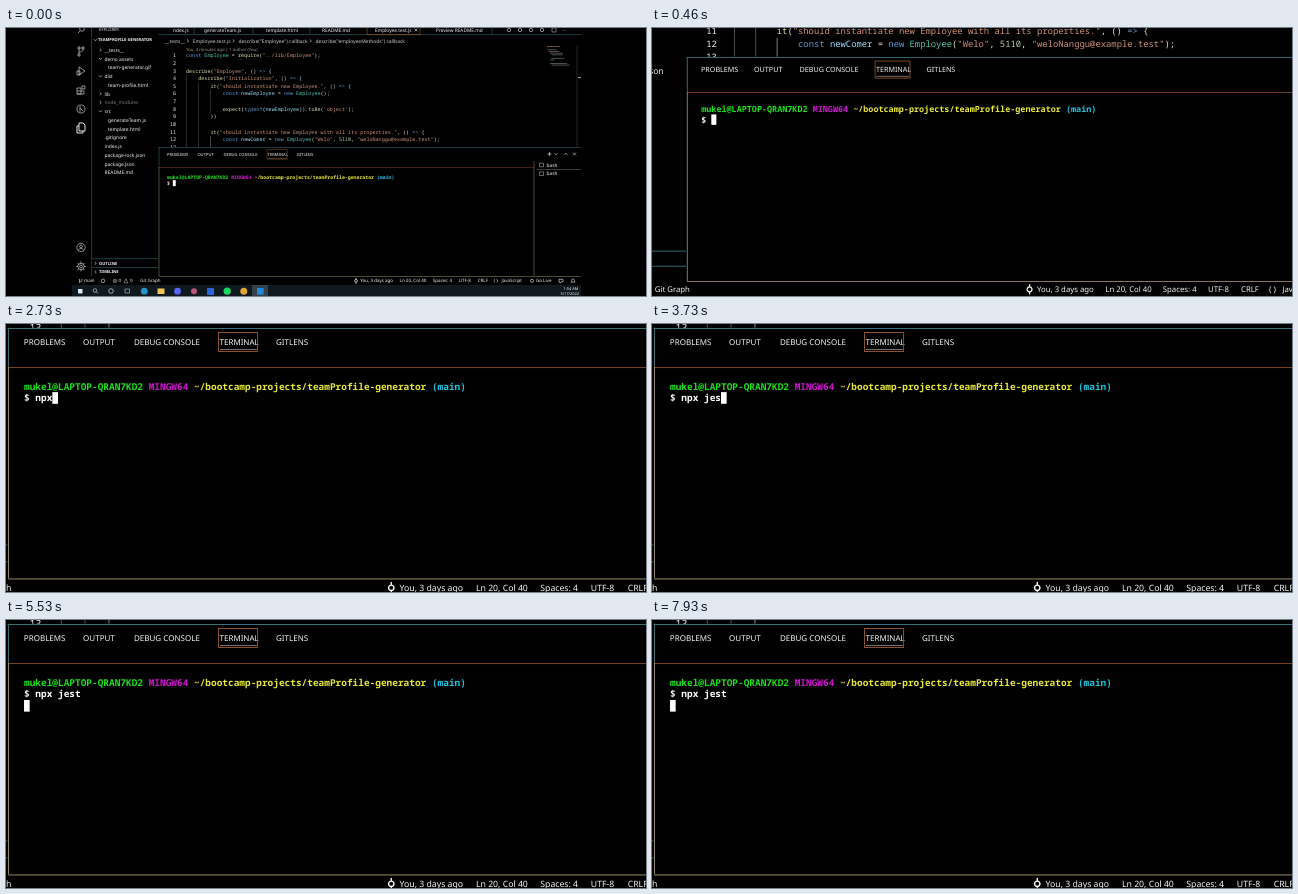
An HTML page with a canvas that plays this animation: 640 by 268 pixels, repeating every 8 s.

```html
<!DOCTYPE html>
<html lang="en">
<head>
<meta charset="utf-8">
<title>Terminal demo</title>
<style>
  html, body { margin: 0; height: 100%; overflow: hidden; background: #000; }
  canvas { display: block; }
</style>
</head>
<body>
<canvas id="stage" width="640" height="268"></canvas>
<script>
const ctx = document.getElementById('stage').getContext('2d');
const LOOP = 8000, ZOOM_TIME = 660;
const ZOOM = { scale: 1.943, x: -294.8, y: -227.5 };
const UI = '"Noto Sans", "Open Sans", sans-serif';
const MONO = '"Noto Sans Mono", "DejaVu Sans Mono", monospace';
const CODE = 5.1, TERM = 4.86, ROW = 7.64, LINE = 0.515;
const TEAL = '#3a7078', TAN = '#958a66', RUST = '#7d431e', LIGHT = '#f4f4f4';

const COLORS = {
  k: '#569cd6', f: '#dcdcaa', s: '#ce9178', c: '#4ec9b0',
  v: '#9cdcfe', n: '#b5cea8', p: '#e0e0e0'
};

// Each code line: indent level, then alternating colour key and text.
const codeLines = [
  [0, 'k', 'const ', 'c', 'Employee', 'p', ' = ', 'f', 'require', 'p', '(', 's', '"../lib/Employee"', 'p', ');'],
  [0],
  [0, 'f', 'describe', 'p', '(', 's', '"Employee"', 'p', ', () ', 'k', '=>', 'p', ' {'],
  [1, 'f', 'describe', 'p', '(', 's', '"Initialization"', 'p', ', () ', 'k', '=>', 'p', ' {'],
  [2, 'f', 'it', 'p', '(', 's', '"should instantiate new Employee."', 'p', ', () ', 'k', '=>', 'p', ' {'],
  [3, 'k', 'const ', 'v', 'newEmployee', 'p', ' = ', 'k', 'new ', 'c', 'Employee', 'p', '();'],
  [3],
  [3, 'f', 'expect', 'p', '(', 'k', 'typeof', 'p', '(', 'v', 'newEmployee', 'p', ')).', 'f', 'toBe', 'p', '(', 's', "'object'", 'p', ');'],
  [2, 'p', '})'],
  [2],
  [2, 'f', 'it', 'p', '(', 's', '"should instantiate new Employee with all its properties."', 'p', ', () ', 'k', '=>', 'p', ' {'],
  [3, 'k', 'const ', 'v', 'newComer', 'p', ' = ', 'k', 'new ', 'c', 'Employee', 'p', '(', 's', '"Welo"', 'p', ', ', 'n', '5110', 'p', ', ', 's', '"weloNanggu@example.test"', 'p', ');'],
  [3]
];

// Prefix: ">" closed folder, "v" open folder, "-" nested file, "." root file.
const tree = ['>__tests__', 'vdemo assets', '-team-generator.gif', 'vdist', '-team-profile.html',
  '>lib', '>node_modules', 'vsrc', '-generateTeam.js', '-template.html', '..gitignore',
  '.index.js', '.package-lock.json', '.package.json', '.README.md'];

const command = 'npx jest';
const keyTimes = [2300, 2480, 2660, 3000, 3300, 3500, 3690, 3900];
const ENTER = 4500;

// y is the middle of the capitals; returns the x where the text ends.
function text(str, x, y, color = LIGHT, size = 4.48, family = UI, weight = 450) {
  ctx.font = `${weight} ${size}px ${family}`;
  ctx.fillStyle = color;
  ctx.fillText(str, x, y + size * 0.36);
  return x + ctx.measureText(str).width;
}

function rect(x, y, w, h, color) {
  ctx.fillStyle = color;
  ctx.fillRect(x, y, w, h);
}

function path(d, x, y, color = '#ccc', width = 0.7) {
  ctx.save();
  ctx.translate(x, y);
  ctx.strokeStyle = color;
  ctx.lineWidth = width;
  ctx.stroke(new Path2D(d));
  ctx.restore();
}

const hLine = (x1, x2, y, color) => rect(x1, y - LINE / 2, x2 - x1, LINE, color);
const vLine = (x, y1, y2, color) => rect(x - LINE / 2, y1, LINE, y2 - y1, color);
const box = (x, y, w, h, color) => path(`M0 0h${w}v${h}h${-w}z`, x, y, color, LINE);

function dot(x, y, r, color) {
  ctx.fillStyle = color;
  ctx.beginPath();
  ctx.arc(x, y, r, 0, 7);
  ctx.fill();
}

const circle = r => `M${r} 0A${r} ${r} 0 1 1 ${-r} 0A${r} ${r} 0 1 1 ${r} 0`;
const CHEVRON = { '>': 'M-.8-1.5L.8 0L-.8 1.5', v: 'M-1.5-.8L0 .8L1.5-.8', '^': 'M-1.5.8L0-.8L1.5.8' };
const CROSS = 'M-1.4-1.4L1.4 1.4M1.4-1.4L-1.4 1.4';

function drawSidebar() {
  vLine(85.5, 0, 248, TEAL);
  path(circle(2.3) + 'M-1.8 1.8L-4 4', 76, 1);
  path('M-2-2V3M-2 1C2 1 2 0 2-2' + 'M-3-4h2v2h-2zM-3 3h2v2h-2zM1-4h2v2h-2z', 75, 23);
  path('M-2-4L4 0L-2 4z' + 'M-4 0h3v4h-3z', 75, 43);
  path('M-4-2h4v6h-4zM-4 1h7v3h-7M1-4h3v3h-3z', 75, 62);
  path(circle(4) + 'M-1-3V3M-1-1L2 2', 75, 81);
  path('M-2-5h4l2 2v6h-6zM-2-2h-2v7h6v-2', 75, 100, '#fff', 0.9);
  path(circle(4.2) + 'M-2.7 3C-2 .5 2 .5 2.7 3M1.4-1A1.4 1.4 0 1 1-1.4-1A1.4 1.4 0 1 1 1.4-1', 75, 219.5);
  path(circle(1.4) + circle(3.2) + 'M0-5v2M0 3v2M-5 0h2M3 0h2M-3.5-3.5l1.3 1.3M2.2 2.2l1.3 1.3M3.5-3.5l-1.3 1.3M-2.2 2.2l-1.3 1.3', 75, 238.5);

  text('EXPLORER', 93, 2, '#ddd', 4.1);
  path(CHEVRON.v, 89.5, 12);
  text('TEAMPROFILE-GENERATOR', 92, 12, LIGHT, 4.1, UI, 700);
  tree.forEach((item, i) => {
    const y = 22 + i * 8.75, kind = item[0];
    if (CHEVRON[kind]) path(CHEVRON[kind], 94.5, y);
    const dim = item.includes('node_modules');
    text(item.slice(1), kind === '-' ? 102 : 98.5, y, dim ? '#777' : LIGHT, 4.9);
  });
  ['OUTLINE', 'TIMELINE'].forEach((label, i) => {
    const y = 235.3 + i * 8.7;
    hLine(86, 152.5, y - 4.5, TEAL);
    path(CHEVRON['>'], 89.5, y);
    text(label, 93, y, LIGHT, 4.1, UI, 700);
  });
}

function drawEditor() {
  const tabs = [['ndex.js', 167], ['generateTeam.js', 198], ['template.html', 260],
    ['README.md', 316], ['Employee.test.js', 369], ['Preview README.md', 430]];
  for (const [name, x] of tabs) text(name, x, 1.8, LIGHT, 4.8);
  hLine(152.5, 575, 6.8, TEAL);
  box(361, -2, 53, 8.6, '#b86a24');
  path(CROSS, 410, 2);
  [188, 247, 304, 486].forEach(x => vLine(x, 0, 6.5, TEAL));
  [503, 514, 525, 536].forEach(x => path(circle(1.7), x, 2));
  box(546, 0, 4, 4, '#ccc');
  text('···', 557, 2);

  let x = 159;
  ['__tests__', 'Employee.test.js', 'describe("Employee") callback', 'describe("employeeMethods") callback']
    .forEach((crumb, i) => {
      if (i) { path(CHEVRON['>'], x + 3, 13); x += 8; }
      x = text(crumb, x, 13, '#ccc', 4.95);
    });
  text('You, 4 minutes ago | 1 author (You)', 180, 21, '#999', 4.3);

  vLine(180.2, 47, 119, '#555');
  vLine(192.4, 54.5, 119, '#555');
  vLine(204.7, 62, 85, '#555');
  vLine(204.7, 108, 119, '#888');
  codeLines.forEach(([indent, ...parts], i) => {
    const y = 27.4 + i * ROW, num = String(i + 1);
    text(num, 170 - num.length * 3.06, y, LIGHT, CODE, MONO);
    let x = 180 + indent * 12.25;
    for (let j = 0; j < parts.length; j += 2)
      x = text(parts[j + 1], x, y, COLORS[parts[j]], CODE, MONO, 500);
    // Minimap
    if (parts.length) rect(541 + indent * 1.5, 18 + i * 1.7, 4 + parts.join('').length * 0.17, 0.7, i % 3 ? '#62706a' : '#8a705f');
  });
  text('···', 231, 32, '#aaa', 4, MONO);
  vLine(571, 17, 119, '#444');
  rect(572, 49, 3, 1, '#aaa');
}

function drawPanel(time) {
  rect(152.5, 119, 423, 129, '#000');
  hLine(152.5, 575, 119.4, TEAL);
  const labels = [['PROBLEMS', 160.9], ['OUTPUT', 191.4], ['DEBUG CONSOLE', 217.6], ['TERMINAL', 261.6], ['GITLENS', 290.7]];
  for (const [label, x] of labels) text(label, x, 126.3, LIGHT, 4.13, UI, 500);
  box(261.1, 121.45, 20.1, 9.8, '#8c512a');
  hLine(261.8, 280.8, 130.2, '#7d7364');
  path('M-2 0H2M0-2V2', 543.5, 126, '#ddd');
  path(CHEVRON.v, 550, 126);
  path(CHEVRON['^'], 560, 126);
  path(CROSS, 568.5, 126);

  vLine(153, 119, 139, TEAL);
  hLine(152.8, 528, 139.5, RUST);
  vLine(153, 139, 248, TAN);
  vLine(528, 133, 248, TAN);
  hLine(152.8, 575, 248.3, TAN);
  [137, 145.7].forEach(y => {
    box(533.5, y - 1.8, 4, 3.6, '#ccc');
    text('bash', 540.5, y, LIGHT, 4.8);
  });
  hLine(531, 575, 141.4, '#777');

  const left = 161, prompt = 149.05, step = 6.1;
  let x = left;
  const segments = [['mukel@LAPTOP-QRAN7KD2 ', '#1be01b'], ['MINGW64 ', '#cc14cc'],
    ['~/bootcamp-projects/teamProfile-generator ', '#e8e83a'], ['(main)', '#1cc4e0']];
  for (const [str, color] of segments) x = text(str, x, prompt, color, TERM, MONO, 600);

  const typed = command.slice(0, keyTimes.filter(t => t <= time).length);
  let caretX = text('$ ' + typed, left, prompt + step, '#fff', TERM, MONO, 600);
  let caretY = prompt + step;
  if (time >= ENTER) {
    caretX = left;
    caretY += step;
  }
  rect(caretX, caretY - 3, 2.9, 6, '#fff');
}

function drawStatusBar() {
  const y = 252.85;
  path('M-1-2V2M-1 1C1.5 1 1.5 0 1.5-2', 74.5, y);
  text('main', 78, y);
  path(circle(1.8), 97, y);
  path(circle(1.8) + 'M-.8-.8L.8.8M.8-.8L-.8.8', 109, y, '#ccc', 0.5);
  text('0', 112.5, y);
  path('M0-2L2 2H-2z', 120, y, '#ccc', 0.5);
  text('0', 124, y);
  path(circle(1.4) + 'M0-3V-1.4M0 1.4V3', 350, y, '#fff');
  const items = [['Git Graph', 134.3], ['You, 3 days ago', 354.3], ['Ln 20, Col 40', 393.6], ['Spaces: 4', 426.7],
    ['UTF-8', 452.7], ['CRLF', 471.7], ['{ }', 487.5], ['JavaScript', 495.5], ['Go Live', 530]];
  for (const [label, x] of items) text(label, x, y, LIGHT, 4.48, UI, 500);
  path(circle(1.5), 526, y);
  path('M-2-1.5h4v2.5h-2l-1 1.2v-1.2h-1z', 555, y);
  path('M-2 1.3h4C1 0 1.5-2 0-2S-1 0-2 1.3z', 567, y);
}

function drawTaskbar() {
  rect(66, 257, 509, 11, '#101820');
  rect(246, 257, 16, 11, '#34424e');
  rect(72, 261, 4.5, 4.5, '#d8e8f4');
  path(circle(1.8) + 'M1.3 1.3L3 3', 89, 262.5);
  path(circle(2.3), 105, 263, '#ddd');
  box(119, 261, 4.5, 4, '#ddd');
  dot(138.3, 263.2, 3.4, '#2396c8');
  rect(151.5, 260.5, 7, 5.5, '#f2c553');
  dot(171.5, 263.2, 3.4, '#5865f2');
  dot(188, 263.2, 3, '#b95778');
  rect(201, 260, 7, 7, '#2866d8');
  dot(221.2, 263.2, 3.6, '#1ed760');
  dot(237.8, 263.2, 3.5, '#e0a63a');
  rect(251, 260, 6.6, 6.6, '#2389d4');
  text('1:54 AM', 557.5, 260.8, '#fff', 3.9);
  text('5/17/2022', 554.5, 266, '#fff', 3.9);
}

function frame(now) {
  const time = now % LOOP;
  const u = Math.min(time / ZOOM_TIME, 1);
  const zoom = u * u * (3 - 2 * u);
  const scale = 1 + (ZOOM.scale - 1) * zoom;

  ctx.setTransform(1, 0, 0, 1, 0, 0);
  rect(0, 0, 640, 268, '#000');
  ctx.setTransform(scale, 0, 0, scale, ZOOM.x * zoom, ZOOM.y * zoom);
  ctx.textRendering = 'geometricPrecision';
  drawSidebar();
  drawEditor();
  drawPanel(time);
  drawStatusBar();
  drawTaskbar();
  requestAnimationFrame(frame);
}
requestAnimationFrame(frame);
</script>
</body>
</html>
```
